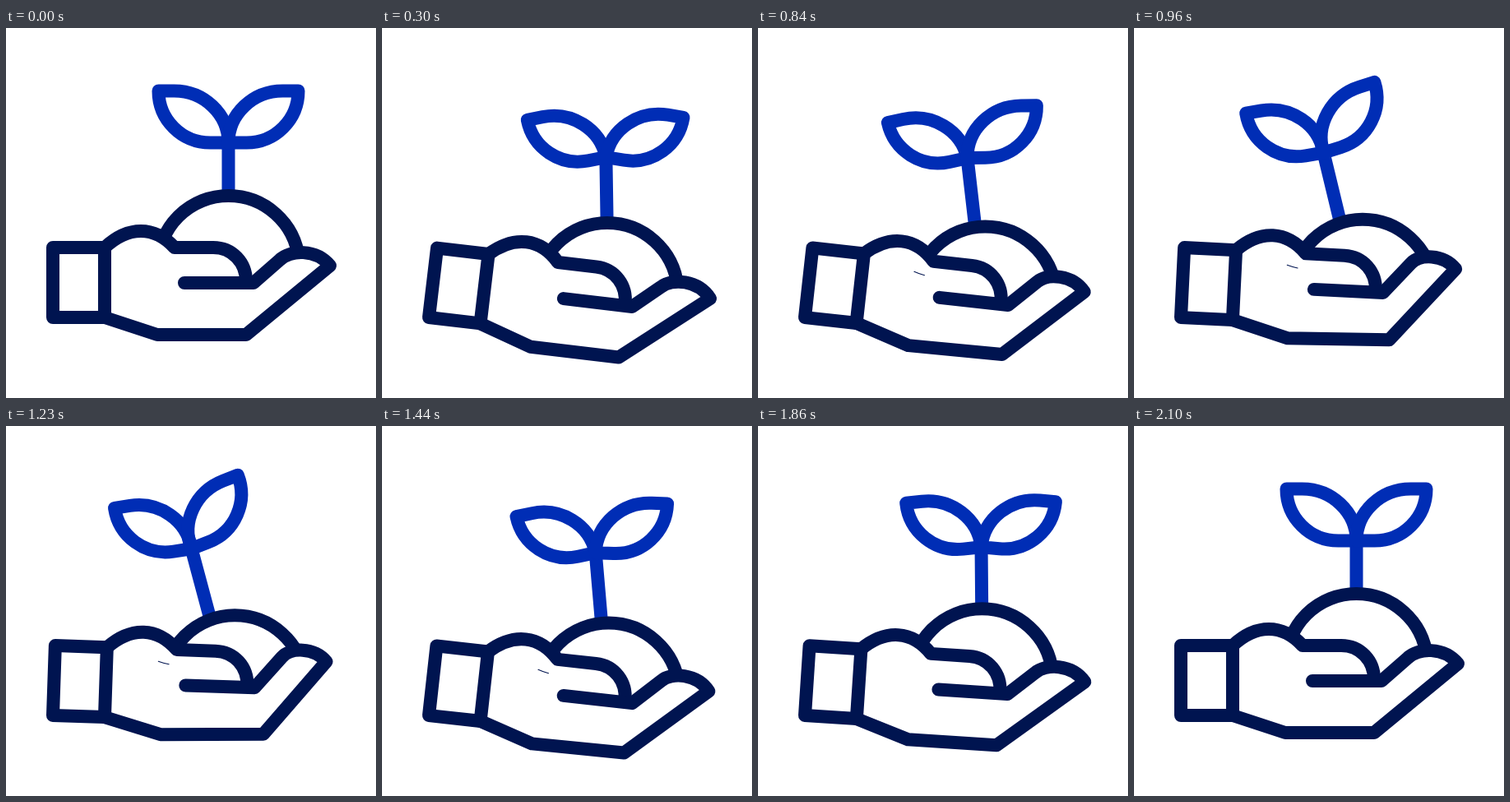
An HTML page with a canvas for the animation above (2250 ms loop, 450 px wide and 450 px high).

```html
<!DOCTYPE html>
<html>
<head>
<meta charset="utf-8">
<style>
html, body { margin: 0; width: 100%; height: 100%; overflow: hidden; background: #fff; }
canvas { display: block; width: 450px; height: 450px; }
</style>
</head>
<body>
<canvas id="stage" width="450" height="450"></canvas>
<script>
const ctx = document.getElementById('stage').getContext('2d');
const NAVY = '#001450', BLUE = '#002db5', LOOP = 2250, STEP = 30;
const LEAF = new Path2D('M0 0C0-35-30-63-66-63H-85C-85-28-57 0-22 0Z');
const WRIST = [57, 352];

// Turning points of the motion: sink, wait, swing left, sink again, rest
const TURNS = [60, 420, 675, 1100, 1600, 2100];
const rad = deg => deg * Math.PI / 180;

// Eases through one value per turning point
function track(t, values) {
  const i = TURNS.findIndex(turn => turn > t);
  if (i < 1) return values[0];
  const u = (t - TURNS[i - 1]) / (TURNS[i] - TURNS[i - 1]);
  return values[i - 1] + (values[i] - values[i - 1]) * (1 - Math.cos(Math.PI * u)) / 2;
}

// Runs draw with the origin moved and turned
function placed(x, y, angle, draw) {
  ctx.save();
  ctx.translate(x, y);
  ctx.rotate(rad(angle));
  draw();
  ctx.restore();
}

const line = path => ctx.stroke(new Path2D(path));

function drawPlant(x, y, lean, droop) {
  ctx.strokeStyle = BLUE;
  placed(x, y, lean, () => {
    line('M0 0V95');
    for (const side of [1, -1]) {
      ctx.save();
      ctx.scale(side, 1);
      ctx.rotate(rad(-droop));
      ctx.stroke(LEAF);
      ctx.restore();
    }
  });
}

function drawBall(x, y) {
  ctx.lineCap = 'butt';
  ctx.beginPath();
  ctx.arc(x, y, 86, Math.PI, rad(-6));
  ctx.fill();
  ctx.stroke();
  ctx.lineCap = 'round';
}

// Bend lifts the fingers; the wrist and thumb stay rigid
function drawHand(bend, creased) {
  const at = (x, y, dx, dy) => `${x + dx * bend} ${y + dy * bend} `;
  const top = 'M120 267C135 253 150 247 164 247C180 247 193 254 205 267H252C275 267 292 285 292 308';
  const fingers = 'L301 310L' + at(333, 282, 0, -9)
    + 'C' + at(345, 270, -2, -9) + at(377, 268, -5, -9) + at(394, 289, -6, -12)
    + 'L' + at(292, 373, 19, -6) + at(184, 373, 4, -2) + '120 352';
  ctx.translate(-WRIST[0], -WRIST[1]);
  ctx.fill(new Path2D(top + fingers + 'Z'));
  line(top);
  line('M217 310' + fingers);
  line('M57 267H120V352H57Z');
  if (creased) {
    ctx.lineWidth = 1;
    line('M183 282Q189 284 196 285');
  }
}

function frame(now) {
  const t = Math.floor(now % LOOP / STEP) * STEP;
  const angle = track(t, [0, 9, 9, 0.8, 8, 0]);
  const sway = track(t, [0, 0, 0, 1, 0, 0]);
  const jointY = track(t, [139.5, 163, 163, 148, 156, 139.5]);
  const dip = angle / 9;

  ctx.fillStyle = '#fff';
  ctx.fillRect(0, 0, 450, 450);
  ctx.lineWidth = 16;
  ctx.lineCap = ctx.lineJoin = 'round';
  drawPlant(270.5 + 2.5 * dip - 54 * sway, jointY, -1.2 * dip - 17.5 * sway, 13.7 * dip - 11 * sway);
  ctx.strokeStyle = NAVY;
  drawBall(270.5 + 4.5 * dip + 8 * sway, 290 + 44 * dip + 20 * sway);
  placed(...WRIST, angle, () => drawHand(1.35 * sway, t >= 690 && t < 1740));
}

const start = performance.now();
function tick() {
  frame(performance.now() - start);
  requestAnimationFrame(tick);
}
tick();
</script>
</body>
</html>
```
